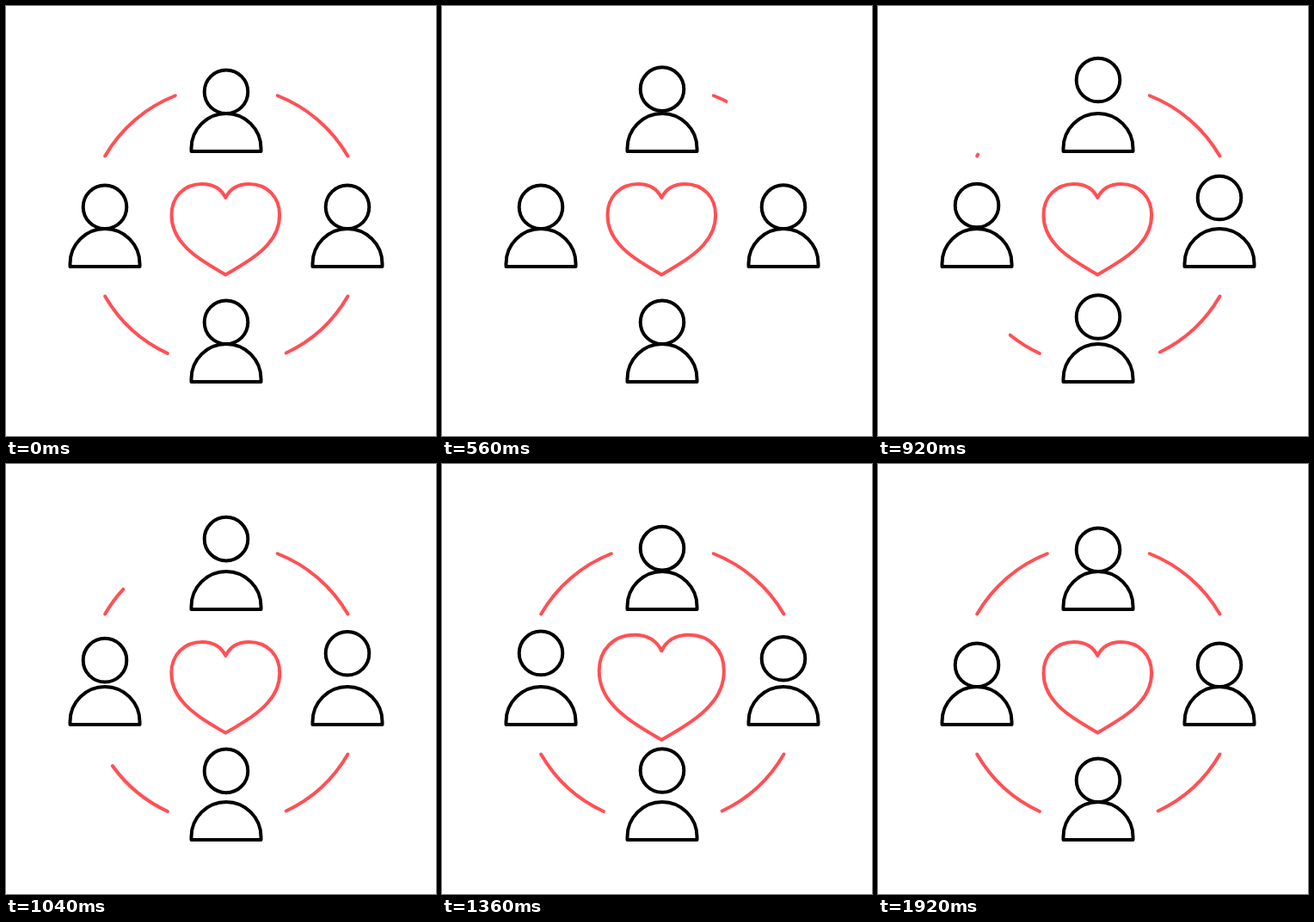
Write an HTML page with a canvas that moves like this. It is 500 px wide and 500 px high and loops after 2 s.

```html
<!DOCTYPE html>
<html lang="en">
<head>
<meta charset="utf-8">
<title>People around a heart</title>
<style>
  html, body { margin: 0; width: 100%; height: 100%; overflow: hidden; background: #fff; }
  canvas { display: block; }
</style>
</head>
<body>
<canvas width="500" height="500"></canvas>
<script>
const ctx = document.querySelector('canvas').getContext('2d');
const LOOP = 2000, STEP = 40, LINE = 4;
const RED = '#ff5055', BLACK = '#000';
const CX = 256.3, CY = 256, RADIUS = 163;

// Arcs run clockwise: start angle, end angle, time the arc grows back
const arcs = [
  { from: -68.6, to: -30, grow: 460 },
  { from: 30, to: 64.8, grow: 560 },
  { from: 114.8, to: 150, grow: 745 },
  { from: 210, to: 248.6, grow: 885 }
];
// Offsets from the top person, and when each head leaves and lands
const people = [
  { x: 0, y: 0, leave: 390, land: 1480 },
  { x: 141, y: 134, leave: 540, land: 1650 },
  { x: 0, y: 268, leave: 670, land: 1740 },
  { x: -141, y: 134, leave: 790, land: 1935 }
];
const body = new Path2D('M215.5 169V165.5A40.5 40.5 0 0 1 296.5 165.5V169Z');
const heart = new Path2D('M255.3 223C250 212 240 207 228 207C207 207 192.5 222 192.5 243' +
  'C192.5 258 198 268 206 277C216 289 232 299 255.3 312.5' +
  'C278.6 299 294.6 289 304.6 277C312.6 268 318.1 258 318.1 243' +
  'C318.1 222 303.6 207 282.6 207C270.6 207 260.6 212 255.3 223Z');

const progress = (t, start, end) => Math.min(1, Math.max(0, (t - start) / (end - start)));
const ease = p => Math.sin(p * Math.PI / 2) ** 2;
const pulse = p => Math.sin(p * Math.PI) ** 2;

function drawArc({ from, to, grow }, t) {
  const regrowing = t >= grow;
  const a = regrowing ? 0 : ease(progress(t, 0, 440));
  const b = regrowing ? ease(progress(t, grow, grow + 400)) : 1;
  if (b - a < 0.005) return;
  const angle = p => (from + (to - from) * p) * Math.PI / 180;
  ctx.beginPath();
  ctx.arc(CX, CY, RADIUS, angle(a), angle(b));
  ctx.stroke();
}

function drawPerson({ x, y, leave, land }, t) {
  ctx.save();
  ctx.translate(x, y);
  ctx.stroke(body);
  ctx.beginPath();
  ctx.arc(256, 99.7 - 13.8 * pulse(progress(t, leave, land)), 25.3, 0, Math.PI * 2);
  ctx.stroke();
  ctx.restore();
}

function drawHeart(t) {
  const scale = 1 + 0.16 * pulse(progress(t, 1010, 1790));
  ctx.save();
  ctx.translate(255.3, 259.7);
  ctx.scale(scale, scale);
  ctx.translate(-255.3, -259.7);
  ctx.lineWidth = LINE / scale;
  ctx.stroke(heart);
  ctx.restore();
}

function draw(now) {
  const t = Math.floor(now % LOOP / STEP) * STEP;
  ctx.fillStyle = '#fff';
  ctx.fillRect(0, 0, 500, 500);
  ctx.lineWidth = LINE;
  ctx.lineCap = ctx.lineJoin = 'round';
  ctx.strokeStyle = RED;
  arcs.forEach(arc => drawArc(arc, t));
  drawHeart(t);
  ctx.strokeStyle = BLACK;
  people.forEach(person => drawPerson(person, t));
}

const start = performance.now();
function tick() {
  draw(performance.now() - start);
  requestAnimationFrame(tick);
}
tick();
</script>
</body>
</html>
```
